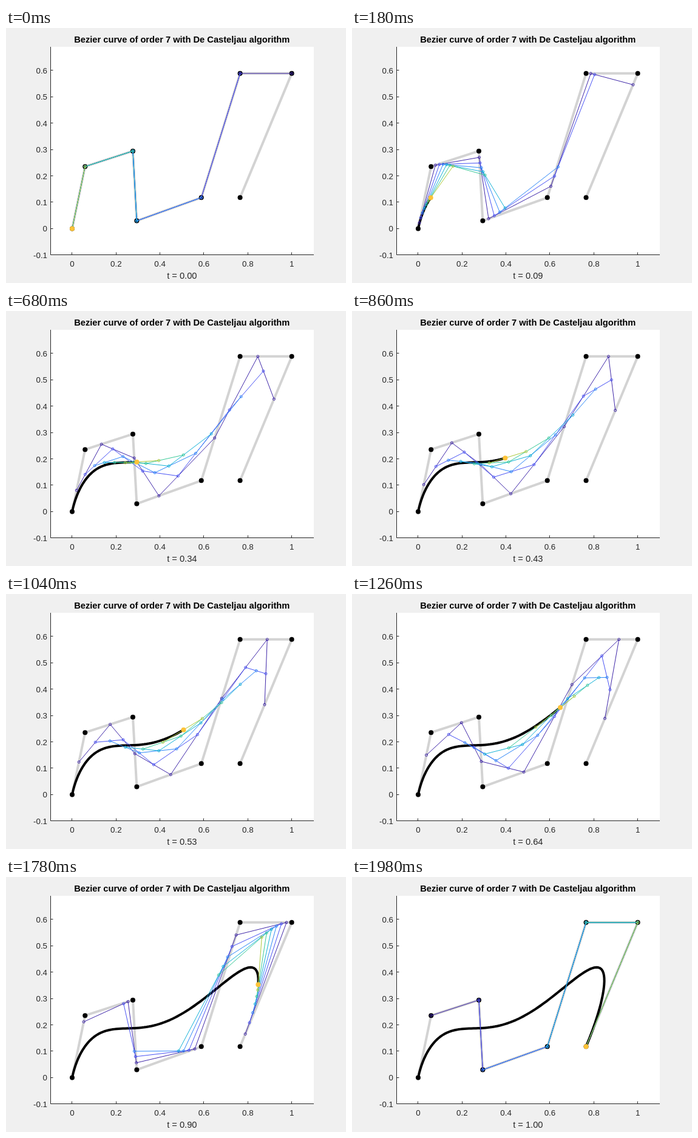
Recreate the animation shown at these times as an HTML page. Size 560 px wide and 420 px high, loop 2000 ms.

```html
<!DOCTYPE html>
<html lang="en">
<head>
<meta charset="utf-8">
<title>Bezier curve</title>
<style>
  html, body { margin: 0; width: 100%; height: 100%; overflow: hidden; background: #f0f0f0; }
  svg { display: block; width: 560px; height: 420px; }
  text { font-family: "Liberation Sans", Arial, sans-serif; font-size: 13.333px; fill: #262626; }
  .title { font-size: 14.667px; font-weight: bold; fill: #000; }
  .label { font-size: 14.667px; }
</style>
</head>
<body>
<svg id="stage" viewBox="0 0 560 420">
  <rect width="560" height="420" fill="#f0f0f0"/>
  <rect x="73" y="31" width="434" height="343" fill="#fff"/>
</svg>
<script>
const STEPS = 100, STEP_MS = 20;
const LEVEL_COLORS = ['#3e26a8', '#4852f4', '#2e87f7', '#12b1d6', '#37c897', '#abc739'];
const TIP_COLOR = '#fec338';

const stage = document.getElementById('stage');
const toX = x => 108.97 + 361.67 * x;
const toY = y => 330.4 - 434.4 * y;

// Control points on a grid of seventeenths
const controls = [[0, 0], [1, 4], [4.7, 5], [5, 0.5], [10, 2], [13, 10], [17, 10], [13, 2]]
  .map(([x, y]) => [toX(x / 17), toY(y / 17)]);

function add(tag, attrs, text) {
  const node = document.createElementNS('http://www.w3.org/2000/svg', tag);
  for (const key in attrs) node.setAttribute(key, attrs[key]);
  if (text !== undefined) node.textContent = text;
  return stage.appendChild(node);
}

const addPath = (stroke, width, d = '') =>
  add('path', { d, stroke, 'stroke-width': width, fill: 'none', 'stroke-linejoin': 'round' });
const addDot = (fill, [cx, cy]) => add('circle', { cx, cy, r: 4, fill });
const polyline = points => 'M' + points.map(p => p[0].toFixed(2) + ' ' + p[1].toFixed(2)).join('L');
const ring = ([x, y]) => `M${x - 2} ${y}a2 2 0 1 0 4 0a2 2 0 1 0 -4 0`;

// Successive interpolation: every level has one point fewer than the one before
function casteljau(t) {
  const levels = [controls];
  while (levels.at(-1).length > 1) {
    const prev = levels.at(-1);
    levels.push(prev.slice(1).map((p, i) => p.map((v, k) => prev[i][k] * (1 - t) + v * t)));
  }
  return levels;
}

function drawAxes() {
  let ticks = 'M73.5 31V373.5H507';
  for (let i = 0; i <= 5; i++) {
    const x = toX(i / 5);
    ticks += `M${Math.floor(x) + 0.5} 373.5v-4`;
    add('text', { x, y: 393, 'text-anchor': 'middle' }, String(i / 5));
  }
  for (let i = -1; i <= 6; i++) {
    const y = toY(i / 10);
    ticks += `M73.5 ${Math.floor(y) + 0.5}h4`;
    add('text', { x: 68, y: Math.round(y + 5), 'text-anchor': 'end' }, String(i / 10));
  }
  addPath('#262626', 1, ticks);
  add('text', { x: 289.8, y: 24, 'text-anchor': 'middle', class: 'title' },
    'Bezier curve of order 7 with De Casteljau algorithm');
}

drawAxes();
addPath('#d3d3d3', 4, polyline(controls));
controls.forEach(p => addDot('#000', p));
const curve = addPath('#000', 4);
const levelPaths = LEVEL_COLORS.map(color => addPath(color, 1));
const tip = addDot(TIP_COLOR, controls[0]);
const label = add('text', { x: 289.8, y: 413, 'text-anchor': 'middle', class: 'label' });

const frames = Array.from({ length: STEPS }, (_, i) => casteljau(i / (STEPS - 1)));
const trail = frames.map(levels => levels.at(-1)[0]);

function render(time) {
  const step = Math.floor(time / STEP_MS + 1e-6) % STEPS;
  const levels = frames[step];
  curve.setAttribute('d', polyline(trail.slice(0, step + 1)));
  levelPaths.forEach((path, i) => {
    const points = levels[i + 1];
    path.setAttribute('d', polyline(points) + points.map(ring).join(''));
  });
  tip.setAttribute('cx', trail[step][0]);
  tip.setAttribute('cy', trail[step][1]);
  label.textContent = 't = ' + (step / (STEPS - 1)).toFixed(2);
}

function tick() {
  render(performance.now());
  requestAnimationFrame(tick);
}
tick();
</script>
</body>
</html>
```
